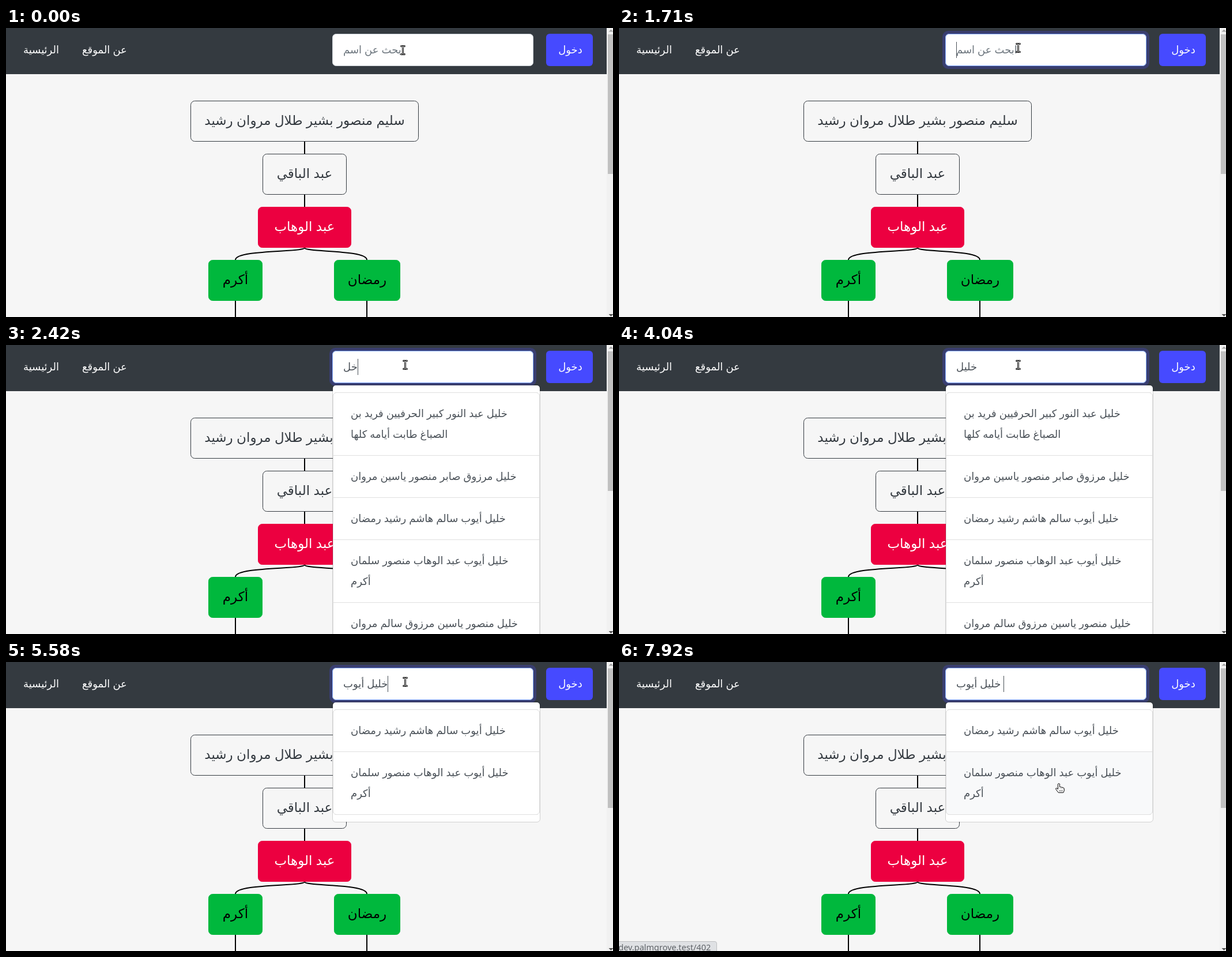
Animation of 1053x501 px, one loop 8 s. Source, as an HTML page:

```html
<!DOCTYPE html>
<html lang="ar">
<head>
<meta charset="utf-8">
<title>Family tree search</title>
<style>
  html, body { margin: 0; width: 100%; height: 100%; overflow: hidden; background: #f6f6f6; }
  svg { display: block; width: 1053px; height: 501px; }
  text { font: 18px "Liberation Sans", "DejaVu Sans", sans-serif; white-space: pre; }
  .node text { font-size: 23px; text-anchor: middle; }
  .nav { fill: #fff; }
  .item text, #typed { fill: #495057; }
  #status text { font: 14.5px "Noto Sans", "Open Sans", sans-serif; fill: #5f6368; }
</style>
</head>
<body>
<svg viewBox="0 0 1053 501" xmlns="http://www.w3.org/2000/svg">
  <rect width="1053" height="501" fill="#f6f6f6"/>
  <path d="M518 196v23M518 288v23M398 472v29M626 472v29M518 381C518 389 398 384 398 402M518 381C518 389 626 384 626 402"
        fill="none" stroke="#000" stroke-width="2"/>
  <g id="tree"></g>

  <rect width="1042" height="80" fill="#343a40"/>
  <text class="nav" x="30" y="44">الرئيسية</text>
  <text class="nav" x="132" y="44">عن الموقع</text>
  <rect x="937" y="10" width="81" height="56" rx="6" fill="#464aff"/>
  <text class="nav" x="979" y="44" text-anchor="middle">دخول</text>

  <rect id="ring" x="561" y="5" width="359" height="66" rx="10" fill="#393e70"/>
  <rect x="566.5" y="10.5" width="348" height="55" rx="6" fill="#fff" stroke="#ced4da"/>
  <rect id="edge" x="566.5" y="10.5" width="348" height="55" rx="6" fill="none" stroke="#80a8ff"/>
  <text id="hint" x="585" y="44" fill="#6c757d">ابحث عن اسم</text>
  <text id="typed" x="585" y="44"></text>
  <rect id="caret" y="24" width="1" height="28" fill="#495057"/>

  <g id="wide"></g>
  <g id="narrow"></g>

  <rect x="1042" width="11" height="501" fill="#f1f1f1"/>
  <rect x="1044" y="11" width="9" height="242" fill="#c1c1c1"/>
  <path d="M1045.5 6.5l4-4 4 4z" fill="#a3a3a3"/>
  <path d="M1045.5 496l4 4 4-4z" fill="#505050"/>

  <g id="status">
    <path d="M-1 502v-17.5h167q3.5 0 3.5 3.5v14z" fill="#dfe1e4" stroke="#bdbfc1"/>
    <text x="-1" y="500">dev.palmgrove.test/402</text>
  </g>

  <g id="beam" fill="none" stroke-linecap="square">
    <path d="M-2.5-7h1.5l1 1 1-1h1.5M-2.5 7h1.5l1-1 1 1h1.5M0-6v12" stroke="#000" stroke-width="3"/>
    <path d="M-2.5-7h1.5l1 1 1-1h1.5M-2.5 7h1.5l1-1 1 1h1.5M0-6v12" stroke="#fff"/>
  </g>
  <path id="arrow" d="M0 0v16l4-3.5 2.5 6 2.5-1-2.5-6h5.5z" fill="#000" stroke="#fff"/>
  <g id="hand" stroke="#000" stroke-linejoin="round">
    <path d="M-1.5 1.5q1.500-2 3 0v5l6 1.2q1.8.5 1.8 2.3v3l-1.5 3.5h-8.5l-4.5-6q-.5-2.2 1.5-1.8l2.2 1.8z" fill="#fff"/>
    <path d="M2 9.5v1M4.5 9.5v1M7 9.5v1M0 13.5h7" fill="none" stroke-width=".7"/>
  </g>
</svg>
<script>
const LOOP = 8000;
const QUERY = 'خليل أيوب ';
const KEYS = [2040, 2290, 2580, 3040, 3420, 4420, 4790, 5170, 5580, 6380];
const CARET_ON = [[420, 830], [1710, 4040], [4420, 6130], [6380, 6960], [7130, LOOP]];
const FOCUS = [[0, 0], [330, .35], [375, .7], [420, 1]];
// time, x, y of the pointer
const POINTER = [
  [0, 688.5, 38.5], [130, 691.5, 38.5], [330, 692.5, 34.5],
  [7130, 702, 120], [7240, 790, 262], [7350, 865, 372],
  [7460, 805, 280], [7580, 763, 201], [7920, 763, 210]
];
const NODES = [
  // centre, top, width, fill, ink, name
  [518, 126, 396, 'none', '#343a40', 'سليم منصور بشير طلال مروان رشيد'],
  [518, 218, 146, '#f6f6f6', '#343a40', 'عبد الباقي'],
  [518, 310, 162, '#ec0040', '#fff', 'عبد الوهاب'],
  [398, 402, 94, '#00b83d', '#000', 'أكرم'],
  [626.5, 402, 115, '#00b83d', '#000', 'رمضان']
];
const MATCHES = [
  ['خليل أيوب سالم هاشم رشيد رمضان'],
  ['خليل أيوب عبد الوهاب منصور سلمان', 'أكرم']
];
const ALL = [
  ['خليل عبد النور كبير الحرفيين فريد بن', 'الصباغ طابت أيامه كلها'],
  ['خليل مرزوق صابر منصور ياسين مروان'],
  ...MATCHES,
  ['خليل منصور ياسين مرزوق سالم مروان']
];

const el = id => document.getElementById(id);
const show = (id, on) => el(id).setAttribute('display', on ? 'inline' : 'none');
const latest = (steps, t) => steps.filter(s => s[0] <= t).pop();

function nodeMarkup([cx, top, width, fill, ink, name]) {
  const edge = ink === '#343a40' ? ink : fill;
  return `<g class="node"><rect x="${cx - width / 2 + .5}" y="${top + .5}" width="${width - 1}" height="70"
    rx="7" fill="${fill}" stroke="${edge}"/><text x="${cx}" y="${top + 42}" fill="${ink}">${name}</text></g>`;
}

function menuMarkup(items) {
  let y = 82.5;
  const rows = items.map(lines => {
    const height = 37 + 36 * lines.length;
    const text = lines.map((s, i) => `<text x="598" y="${y + 42.5 + 36 * i}">${s}</text>`).join('');
    const row = `<g class="item" data-top="${y}" data-bottom="${y + height}">
      <rect x="567.5" y="${y}" width="358" height="${height}" fill="#fff" stroke="#dfdfdf"/>${text}</g>`;
    y += height;
    return row;
  });
  return `<clipPath id="list${items.length}"><rect x="567" y="82" width="359" height="${y - 81.5}" rx="6"/></clipPath>
    <rect x="567" y="70" width="359" height="${y - 57.5}" rx="5" fill="#fff"/>
    <rect x="566.5" y="69.5" width="360" height="${y - 56.5}" rx="5.5" fill="none" stroke="#000" stroke-opacity=".15"/>
    <g clip-path="url(#list${items.length})">${rows.join('')}</g>
    <rect x="567.5" y="82.5" width="358" height="${y - 82.5}" rx="6" fill="none" stroke="#dfdfdf"/>`;
}

el('tree').innerHTML = NODES.map(nodeMarkup).join('');
el('wide').innerHTML = menuMarkup(ALL);
el('narrow').innerHTML = menuMarkup(MATCHES);
const rows = [...el('narrow').querySelectorAll('.item')];

function drawPointer(t) {
  const [, x, y] = latest(POINTER, t);
  const inField = t < 7130;
  let hovered = false;
  for (const row of rows) {
    const over = !inField && y > +row.dataset.top && y < +row.dataset.bottom;
    row.firstElementChild.setAttribute('fill', over ? '#f8f9fa' : '#fff');
    hovered = hovered || over;
  }
  const kind = inField ? 'beam' : hovered ? 'hand' : 'arrow';
  for (const id of ['beam', 'hand', 'arrow']) show(id, id === kind);
  el(kind).setAttribute('transform', `translate(${x} ${y})`);
}

function draw(t) {
  const typed = QUERY.slice(0, KEYS.filter(k => k <= t).length);
  const field = el('typed');
  if (field.textContent !== typed) field.textContent = typed;
  const width = typed ? field.getComputedTextLength() : 0;
  el('caret').setAttribute('x', Math.round(585 + width));
  show('caret', CARET_ON.some(([from, to]) => t >= from && t < to));
  show('hint', !typed);

  const focus = latest(FOCUS, t)[1];
  el('ring').setAttribute('opacity', focus);
  el('edge').setAttribute('opacity', focus);

  show('wide', t >= 2420 && t < 4420);
  show('narrow', t >= 4420);
  show('status', t >= 7920);
  drawPointer(t);
}

const start = performance.now();
function frame() {
  draw((performance.now() - start) % LOOP);
  requestAnimationFrame(frame);
}
frame();
</script>
</body>
</html>
```
